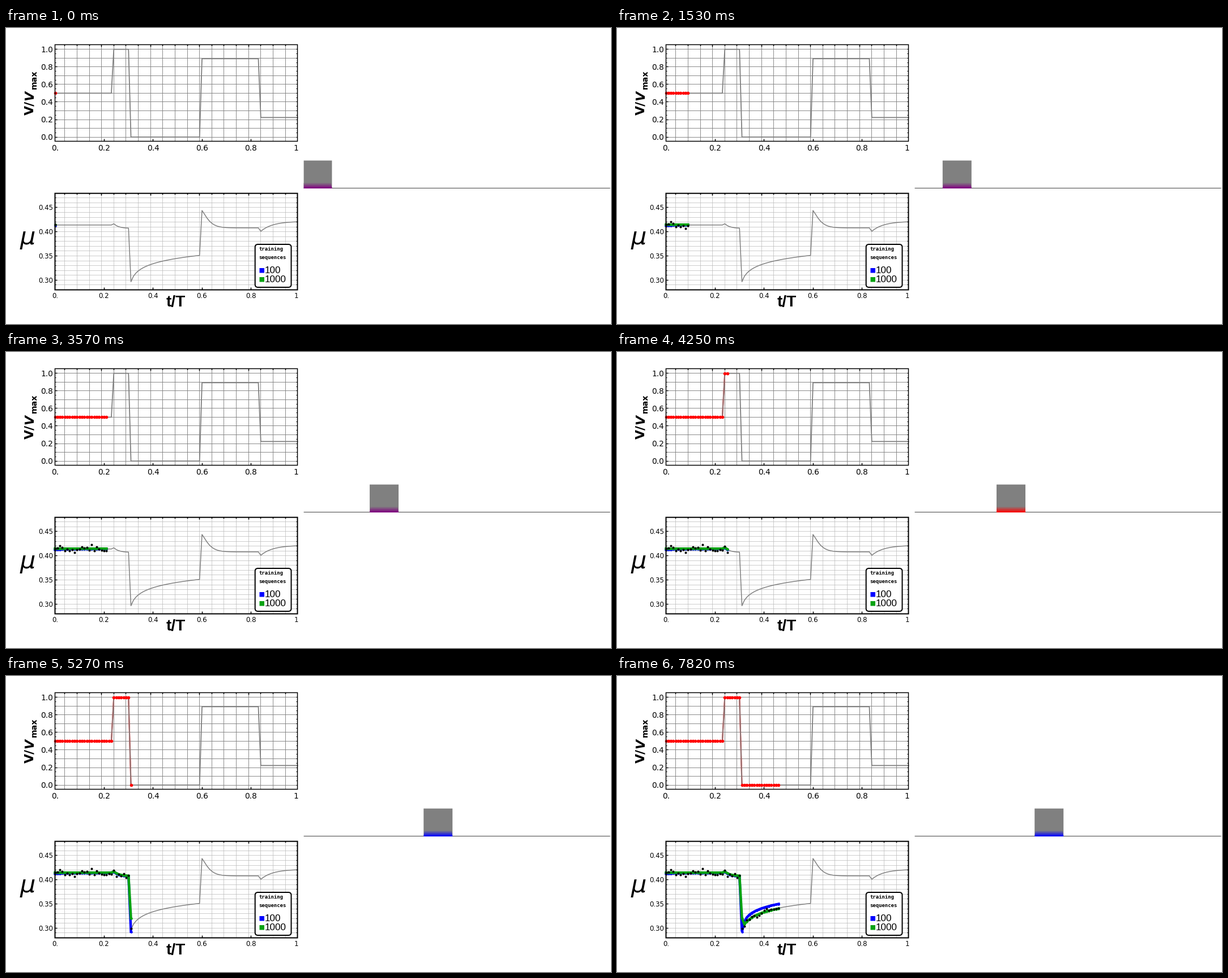
A matplotlib script for the animation above (7.99 s loop, 1068 by 524 pixels).

```python
import numpy as np
import matplotlib.pyplot as plt
from matplotlib.animation import FuncAnimation
from matplotlib.patches import FancyBboxPatch, Rectangle

W, H, DPI = 1068, 524, 64
PT = 72 / DPI  # points per pixel
STEPS, INTERVAL = 47, 170
LEFT, RIGHT = 86.5, 514.5
GREY = "#808080"
GREEN = "#08a212"

plt.rcParams["path.snap"] = False
fig = plt.figure(figsize=(W / DPI, H / DPI), dpi=DPI, facecolor="white")
ax = fig.add_axes([0, 0, 1, 1])
ax.set_xlim(0, W)
ax.set_ylim(H, 0)
ax.set_autoscale_on(False)
ax.axis("off")


def tx(t):
    return LEFT + 432.5 * np.asarray(t)


def vy(v):
    return 193.1 - 155.4 * np.asarray(v)


def my(mu):
    return 360.7 - 855 * (np.asarray(mu) - 0.4)


def line(x, y, color, width, z, **kw):
    return ax.plot(x, y, color=color, lw=width * PT, zorder=z, **kw)[0]


def hrule(y, x0, x1, color, width, z):
    y = np.floor(y) + 0.5
    line([x0, x1], [y, y], color, width, z, solid_capstyle="butt")


def vrule(x, y0, y1, color, width, z):
    x = np.floor(x) + 0.5
    line([x, x], [y0, y1], color, width, z, solid_capstyle="butt")


def label(x, y, s, size, font="DejaVu Sans", **kw):
    return ax.text(x, y, s, fontsize=size * PT, family=font, color="black",
                   va="baseline", zorder=9, **kw)


def panel(top, bottom, width, grid, ys, majors, minors, size, fmt, label_y):
    """Frame, grid, ticks and tick labels of one chart."""
    for y in ys:
        hrule(y, LEFT, RIGHT, *grid, 1)
    for i in range(19):
        x = tx(0.04 + 0.05 * i)
        vrule(x, top, bottom, *grid, 1)
        vrule(x, top, top + (4 if i % 4 == 3 else 2.5), "black", 1.5, 5)
    for y in minors:
        hrule(y, LEFT, LEFT + 2, "black", 1, 5)
        hrule(y, RIGHT - 2, RIGHT, "black", 1, 5)
    for value, y in majors:
        hrule(y, LEFT, LEFT + 4, "black", 1.4, 5)
        label(83, y + 0.365 * size, fmt % value, size, ha="right")
    for i, s in enumerate(["0.", "0.2", "0.4", "0.6", "0.8", "1"]):
        x = tx(0.2 * i) if i < 5 else 512
        if 0 < i < 5:
            vrule(x, bottom - 4, bottom, "black", 1.5, 5)
        label(x, label_y, s, size, ha="center")
    ax.add_patch(Rectangle((LEFT, top), RIGHT - LEFT, bottom - top, fill=False,
                           ec="black", lw=width * PT, zorder=6))


hundredths = my(np.arange(0.29, 0.475, 0.01))
panel(29.5, 200.5, 1.5, (GREY, 0.9), vy(np.arange(11) / 10),
      [(v, vy(v)) for v in np.arange(6) / 5], vy(np.arange(21) / 20),
      13.7, "%.1f", 217)
panel(292.7, 463.5, 2, ("#b8b8b8", 0.7), hundredths,
      [(m, my(m)) for m in (0.3, 0.35, 0.4, 0.45)], hundredths,
      11.8, "%.2f", 478)

# Axis titles
up = dict(rotation=90, rotation_mode="anchor", weight="bold")
label(48.5, 153.5, "V/", 22, **up)
label(48.5, 128.5, "V", 22, style="oblique", **up)
label(53.5, 108.5, "max", 14.3, **up)
label(25, 383.5, "μ", 43, style="oblique")
label(300, 493, "t/T", 28, "Liberation Sans", weight="bold", ha="center")

# Legend
ax.add_patch(FancyBboxPatch((439.7, 383), 63.8, 76,
                            boxstyle="round,pad=0,rounding_size=5",
                            fc="white", ec="black", lw=2 * PT, zorder=8))
for y, s in [(394, "training"), (408.7, "sequences")]:
    label(446.7, y, s, 9, "DejaVu Sans Mono", weight="bold")
for y, s, color in [(425, "100", "blue"), (441, "1000", GREEN)]:
    ax.add_patch(Rectangle((447.5, y), 8.5, 8.5, fc=color, lw=0, zorder=9))
    label(457, y + 9, s, 17.1, "Liberation Sans")

# Reference curves
k = np.arange(100)
x = tx(k / 100)
speed = np.select([k < 24, k < 31, k < 60, k < 84], [0.5, 1, 0, 0.893], 0.223)


def friction(i):
    if i < 24:
        return 0.414
    if i < 31:
        return 0.407 + 0.0095 * np.exp(-(i - 24) / 2)
    if i < 60:
        return 0.2965 + 0.0162 * np.log(i - 30)
    if i < 84:
        return 0.408 + 0.036 * np.exp(-((i - 60) / 3.2) ** 1.25)
    return 0.401 + 0.0205 * (1 - np.exp(-(i - 84) / 4.8))


mu = np.array([friction(i) for i in k])
line(x, vy(speed), GREY, 1.8, 3)
line(x, my(mu), GREY, 1.5, 2)

# Predictions relax towards the true curve after the stop; samples are noisy
since = np.maximum(k - 31, 0)
moving = k < 31
blue_mu = mu + np.where(moving, -0.0015 * np.exp(-k / 4),
                        0.0085 - 0.0125 * np.exp(-1.4 * since))
green_mu = mu + np.where(moving, 0.0008, 0.025 * np.exp(-3 * since) - 0.001)
noise = np.random.default_rng(4).normal(0, 0.003, k.size)
sample_mu = mu + noise + 0.0025 * np.cos(2 * np.pi * (k - 15) / 14)


def trace(color, width, z, size):
    return line([], [], color, width, z, marker="o", ms=size * PT, mew=0,
                solid_joinstyle="miter", solid_capstyle="projecting")


red_line = line([], [], "red", 2.2, 2)
red_dots = trace("red", 0, 4, 5.6)
blue_line = trace("blue", 4.5, 3, 4.5)
green_line = trace(GREEN, 4.5, 4, 4.5)
samples = trace("black", 0, 5, 4)
series = [(red_line, vy(speed)), (red_dots, vy(speed)),
          (blue_line, my(blue_mu)), (green_line, my(green_mu)),
          (samples, my(sample_mu))]

# Sliding block with a heated base
SIZE, ROWS, TOP, FLOOR = 51, 10, 234.6, 284
EDGE = 525.6
hrule(283, EDGE, 1066.5, "#505050", 1.1, 2)
travel = 524.4 + 11.2 * np.concatenate([[0], np.cumsum(speed)])
block = ax.add_patch(Rectangle((0, TOP), SIZE, FLOOR - TOP, fc=GREY, lw=0,
                               zorder=3))
rows = [ax.add_patch(Rectangle((0, FLOOR - ROWS + i), SIZE, 1, lw=0, zorder=4))
        for i in range(ROWS)]


def place(rect, x0, x1):
    x0 = max(x0, EDGE)
    rect.set_x(x0)
    rect.set_width(x1 - x0)


def update(n):
    for artist, y in series:
        artist.set_data(x[:n + 1], y[:n + 1])
    x0 = travel[n]
    place(block, x0, x0 + SIZE)
    v = speed[n]
    heat = np.array([v, 0, 1 - v])
    for i, row in enumerate(rows):
        mix = (i + 1) / ROWS
        inset = 1.5 * (1 - mix) if v < 1 else 0
        place(row, x0 + inset, x0 + SIZE - inset)
        row.set_facecolor(0.502 * (1 - mix) + heat * mix)
    return [artist for artist, _ in series] + [block] + rows


anim = FuncAnimation(fig, update, frames=STEPS, interval=INTERVAL, repeat=True,
                     repeat_delay=0, init_func=lambda: update(0))
plt.show()
```
